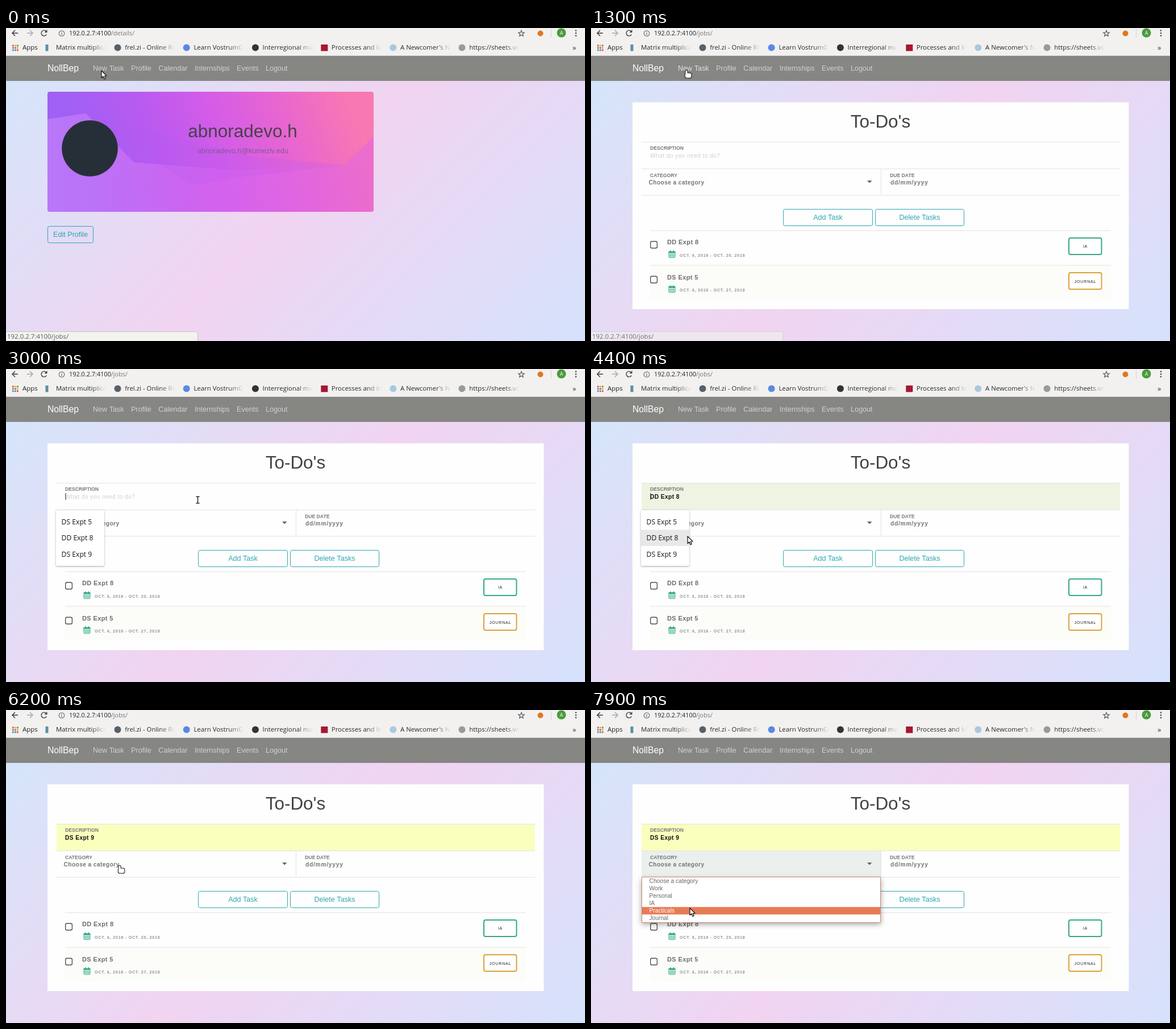
Recreate the animation shown at these times as an HTML page with a canvas. Size 1019 by 550 pixels, loop 8000 ms.

```html
<!DOCTYPE html>
<html lang="en">
<head>
<meta charset="utf-8">
<title>To-Do's</title>
<style>
  html, body { margin: 0; width: 100%; height: 100%; overflow: hidden; background: #f2f1f0; }
  canvas { display: block; width: 1019px; height: 550px; }
</style>
</head>
<body>
<canvas id="stage" width="1019" height="550"></canvas>
<script>
const ctx = document.getElementById('stage').getContext('2d');
const W = 1019, H = 550, LOOP = 8000, STEP = 100;
const REM = 12.58, SMALL = REM * 13 / 16;
const SANS = '"Liberation Sans", Arial, sans-serif';
const UI = '"Open Sans", "Noto Sans", sans-serif';
const TEAL = '#2fa5b0', GREEN = '#3fae92', LINE = '#e2e3e3', INK = '#444';
const HOST = '192.0.2.7:4100';

// Times at which the interface changes
const T = { hover: 100, load: 1000, page: 1300, settled: 1400, click: 2600, suggest: 2900,
            fill: 4000, preview: 4200, filled: 4800, pick: 5700, closed: 5800, blur: 6200,
            focus: 6400, list: 6500, browse: 6900 };

// Pointer legs: each eases from wherever the last one ended
const LEGS = [
  { from: 0, to: 1, x: 168, y: 75 },
  { from: 1500, to: 1900, x: 402, y: 301 },
  { from: 2100, to: 2400, x: 374, y: 267 },
  { from: 2500, to: 3000, x: 337.5, y: 230 },
  { from: 3900, to: 4300, x: 170, y: 294 },
  { from: 4400, to: 5000, x: 155, y: 294 },
  { from: 5000, to: 5500, x: 139, y: 318 },
  { from: 5800, to: 6200, x: 200, y: 274 },
  { from: 6800, to: 7100, x: 184, y: 323 },
  { from: 7400, to: 7800, x: 174, y: 348 }
];

const NAV = ['New Task', 'Profile', 'Calendar', 'Internships', 'Events', 'Logout'];
const SUGGESTIONS = ['DS Expt 5', 'DD Expt 8', 'DS Expt 9'];
const OPTIONS = ['Choose a category', 'Work', 'Personal', 'IA', 'Practicals', 'Journal'];
const BOOKMARKS = [
  ['Matrix multiplication', '#5b8fa5'], ['frel.zi - Online Room', '#56616b'],
  ['Learn VostrumGrid', '#5a88e4'], ['Interregional maps', '#333'],
  ['Processes and Ideas', '#a81631'], ["A Newcomer's Notes", '#a8c9de'],
  ['https://sheets.vo', '#9a9a9a']
];
const TASKS = [
  { name: 'DD Expt 8', dates: 'OCT. 6, 2018 - OCT. 20, 2018', tag: 'IA', color: '#35a78b' },
  { name: 'DS Expt 5', dates: 'OCT. 6, 2018 - OCT. 27, 2018', tag: 'JOURNAL', color: '#dca13a' }
];

const lerp = (a, b, k) => a + (b - a) * k;
const clamp = (v, a, b) => Math.max(a, Math.min(b, v));
const between = (t, a, b) => t >= a && t < b;
const easeOut = k => 1 - (1 - k) ** 2;
const mix = (a, b, k) => `rgb(${a.map((v, i) => Math.round(lerp(v, b[i], k)))})`;

function text(str, x, y, size, color, o = {}) {
  ctx.font = `${o.bold ? 'bold ' : ''}${size}px ${o.font || SANS}`;
  ctx.letterSpacing = (o.gap || 0) + 'px';
  ctx.textAlign = o.align || 'left';
  ctx.fillStyle = color;
  ctx.fillText(str, x, y);
  return ctx.measureText(str).width;
}

function rect(x, y, w, h, color) {
  ctx.fillStyle = color;
  ctx.fillRect(x, y, w, h);
}

function paint(fill, stroke, width = 1) {
  if (fill) { ctx.fillStyle = fill; ctx.fill(); }
  if (stroke) { ctx.strokeStyle = stroke; ctx.lineWidth = width; ctx.stroke(); }
}

function box(x, y, w, h, r, fill, stroke, width) {
  ctx.beginPath();
  ctx.roundRect(x, y, w, h, r);
  paint(fill, stroke, width);
}

function disc(x, y, r, fill, stroke, width) {
  ctx.beginPath();
  ctx.arc(x, y, r, 0, Math.PI * 2);
  paint(fill, stroke, width);
}

function poly(points, fill, stroke, width) {
  ctx.beginPath();
  points.forEach(([x, y]) => ctx.lineTo(x, y));
  ctx.closePath();
  paint(fill, stroke, width);
}

function line(color, width, ...points) {
  ctx.beginPath();
  points.forEach(([x, y]) => ctx.lineTo(x, y));
  paint(null, color, width);
}

function gradient(x0, y0, x1, y1, ...colors) {
  const g = ctx.createLinearGradient(x0, y0, x1, y1);
  colors.forEach((c, i) => g.addColorStop(i / (colors.length - 1), c));
  return g;
}

function shadowed(blur, dy, alpha, drawShape) {
  ctx.save();
  ctx.shadowColor = `rgba(0,0,0,${alpha})`;
  ctx.shadowBlur = blur;
  ctx.shadowOffsetY = dy;
  drawShape();
  ctx.restore();
}

function pointer(t) {
  let { x, y } = LEGS[0];
  for (const leg of LEGS) {
    const k = easeOut(clamp((t - leg.from) / (leg.to - leg.from), 0, 1));
    x = lerp(x, leg.x, k);
    y = lerp(y, leg.y, k);
  }
  return { x, y };
}

function pointerKind(t, { x, y }) {
  if (t < T.hover || t >= T.browse) return 'arrow';
  if (y < 90) return 'hand';
  if (between(t, T.suggest, T.closed) && x < 174 && y > 248) return 'arrow';
  if (between(y, 200, 247)) return 'beam';
  return between(y, 248, 293) && x < 510 ? 'hand' : 'arrow';
}

function drawHand() {
  const parts = () => {
    ctx.beginPath();
    ctx.roundRect(-1.6, -.5, 3.2, 9, 1.6);
    ctx.roundRect(-2.2, 4.6, 10.6, 7.8, 2.4);
  };
  parts();
  paint(null, '#111', 2);
  parts();
  paint('#fff');
}

function drawBeam() {
  for (const [color, width] of [['#fff', 3], ['#222', 1.5]]) {
    line(color, width, [0, -5.5], [0, 5.5]);
    for (const y of [-5.7, 5.7]) line(color, width, [-3, y], [3, y]);
  }
}

function drawArrow() {
  poly([[0, 0], [0, 12.5], [3, 10], [5, 14.7], [7.2, 13.8], [5.2, 9.3], [9, 9]], '#fff', '#111', 1.2);
}

function drawPointer(t, p) {
  ctx.save();
  ctx.translate(p.x, p.y);
  ctx.lineJoin = 'round';
  ({ arrow: drawArrow, hand: drawHand, beam: drawBeam })[pointerKind(t, p)]();
  ctx.restore();
}

function backArrow(x, dir, color) {
  line(color, 1.6, [x - 5 * dir, 9], [x + 5 * dir, 9]);
  line(color, 1.6, [x, 4], [x - 5 * dir, 9], [x, 14]);
}

function drawAddressRow(t) {
  backArrow(16, 1, INK);
  backArrow(42, -1, '#aaa');
  if (between(t, T.load, T.page)) {
    line(INK, 1.7, [63, 5], [71, 13]);
    line(INK, 1.7, [71, 5], [63, 13]);
  } else {
    ctx.beginPath();
    ctx.arc(67, 9, 4.8, .5, 5.4);
    paint(null, INK, 1.6);
    poly([[72.5, 3], [72.5, 8], [67.5, 8]], INK);
  }
  disc(98, 9.5, 4.8, null, '#666', 1.1);
  rect(97.4, 8.7, 1.2, 3.6, '#666');
  rect(97.4, 6.5, 1.2, 1.3, '#666');

  const w = text(HOST, 111, 13.3, 10.9, '#222', { font: UI });
  text(t < T.load ? '/details/' : '/jobs/', 111 + w, 13.3, 10.9, '#777', { font: UI });

  const star = Array.from({ length: 10 }, (_, i) => {
    const a = i * Math.PI / 5 - Math.PI / 2, r = i % 2 ? 2.4 : 5.5;
    return [907 + r * Math.cos(a), 9.8 + r * Math.sin(a)];
  });
  poly(star, null, '#555', 1.2);
  disc(940.5, 9.5, 5, '#e2761f');
  rect(959, 2, 1, 15, '#d5d4d2');
  disc(977.5, 8.5, 8, '#4a9b3c');
  text('A', 977.5, 12, 9, '#fff', { font: UI, align: 'center' });
  for (let i = -1; i <= 1; i++) disc(1003, 9 + i * 4.5, 1.3, INK);
}

function drawBookmarks() {
  const dots = ['#e2523f', '#efa53a', '#46a35a', '#4a84dd'];
  for (let i = 0; i < 9; i++)
    rect(11 + i % 3 * 4, 29.5 + Math.floor(i / 3) * 4, 2.8, 2.8, dots[i % 4]);
  text('Apps', 29, 38.3, 11.5, '#222', { font: UI });
  BOOKMARKS.forEach(([label, color], i) => {
    const x = 88 + i * 121.2, end = x + 88;
    if (i % 4) disc(x - 12.7, 34.5, 6, color);
    else rect(x - 18.5, 29, i ? 12 : 5, 11.5, color);
    const fade = gradient(end - 26, 0, end, 0, 'rgba(40,40,40,1)', 'rgba(40,40,40,0)');
    text(label, x, 38.3, 11.4, fade, { font: UI });
  });
  text('»', 997, 38.5, 13, '#333', { font: UI });
}

function drawNav(t) {
  rect(0, 49, W, 44, '#868683');
  text('NollBep', 73, 76.3, REM * 1.25, '#fff');
  let x = 153;
  NAV.forEach((label, i) => {
    const lit = i === 0 && between(t, T.hover, 1600);
    x += text(label, x, 74.8, REM, lit ? '#dfe3e6' : '#cdd3d6') + REM;
  });
}

function button(label, x, y, w) {
  box(x + .5, y + .5, w - 1, 29, 3, null, TEAL);
  text(label, x + w / 2, y + 18.7, REM, TEAL, { align: 'center' });
}

function drawProfile() {
  const right = 647, bottom = 323;
  ctx.save();
  ctx.beginPath();
  ctx.roundRect(73, 112, 574, 211, 4);
  ctx.clip();
  rect(73, 112, 574, 211, gradient(150, 250, 590, 90, '#a060f4', '#b85af0', '#d45ce8', '#e866cf', '#f878b2'));
  poly([[73, 160], [140, 150], [225, 236], [405, 250], [595, 241], [right, 190], [right, bottom], [73, bottom]],
       gradient(73, 0, right, 0, 'rgba(200,134,252,.6)', 'rgba(216,104,240,.6)', 'rgba(226,100,226,.5)'));
  poly([[140, 150], [325, 277], [405, 263], [595, 241], [430, 225]], 'rgba(180,85,240,.2)');
  ctx.restore();
  disc(147.5, 211.5, 49.3, '#262f38');
  text('abnoradevo.h', 416.5, 192, REM * 2.5, '#46424a', { align: 'center' });
  text('abnoradevo.h@kumeziv.edu', 417, 219.8, REM, '#80599a', { align: 'center' });
  button('Edit Profile', 73, 348, 81);
}

function drawCalendar(x, y) {
  box(x + .5, y + 2, 11, 10.5, 1, null, GREEN);
  rect(x, y + 1.5, 12, 3, GREEN);
  for (let i = 1; i <= 3; i++) rect(x + i * 2.75 + .1, y + 4, .8, 8, GREEN);
  for (let i = 1; i <= 2; i++) {
    rect(x, y + 4 + i * 2.7, 12, .8, GREEN);
    rect(x - 3 + i * 5.5, y, 1.6, 3, '#2b9379');
  }
}

function drawTask({ name, dates, tag, color }, i) {
  const y = 356 + i * 61.3, top = Math.round(y);
  if (i % 2) rect(104, top + 1, 811, 60, '#fcfdf9');
  rect(104, top - .5, 811, 1, LINE);
  box(104.7, y + 19, 11.7, 11.7, 2.5, '#fff', '#505050', 1.4);
  text(name, 134, y + 24.3, 11, '#6c6c6c', { bold: true, gap: .39 });
  drawCalendar(136.5, y + 35);
  text(dates, 156, y + 46, 7.08, '#8e9296', { bold: true, gap: .78 });
  box(841, top + 13, 57.5, 29, 3, '#fff', color, 2);
  text(tag, 870, y + 30.4, 7.08, '#222', { gap: .78, align: 'center' });
}

function caretOn(t) {
  if (t < T.click || t >= T.blur) return false;
  const reset = t < T.preview ? T.click : t < T.pick ? T.preview : T.pick;
  return (t - reset) % 1000 < 500;
}

function drawField(t, row) {
  const white = [254, 254, 254], focus = [238, 243, 226], yellow = [249, 255, 189];
  const k = clamp((t - T.fill) / (T.filled - T.fill), 0, 1) * 2;
  rect(89, 201, 842, 46, k < 1 ? mix(white, focus, k) : mix(focus, yellow, k - 1));
  rect(89, 200, 842, 1, LINE);
  rect(89, 247, 842, 1, LINE);
  label('DESCRIPTION', 104, 214);
  if (t < T.preview) text('What do you need to do?', 104, 227.6, SMALL, '#d0d0d0', { gap: .39 });
  else text(SUGGESTIONS[row], 104, 227.6, SMALL, '#111', { bold: true, gap: .39 });
  if (caretOn(t)) rect(t < T.pick ? 104.5 : 156.5, 218, 1, 12, '#222');
}

function label(str, x, y) {
  text(str, x, y, REM * 11 / 16, '#777', { bold: true });
}

function drawTodo(t, row) {
  rect(73, 130.5, 873.5, 363.5, '#fefefe');
  text("To-Do's", 509.5, 174.6, REM * 2.5, '#424242', { align: 'center' });
  drawField(t, row);

  if (t >= T.focus) rect(89, 248, 421, 46, '#ebefed');
  label('CATEGORY', 104, 261.5);
  text('Choose a category', 101.5, 274.8, SMALL, '#757575', { bold: true, gap: .39 });
  poly([[486, 268], [494.5, 268], [490.2, 272.5]], '#666');
  label('DUE DATE', 526, 261.5);
  text('dd/mm/yyyy', 527, 274.8, SMALL, '#757575', { bold: true, gap: .75 });
  rect(510, 248, 1, 45, LINE);
  rect(89, 293.5, 842, 1, LINE);

  button('Add Task', 338, 318, 158);
  button('Delete Tasks', 500, 318, 157);
  TASKS.forEach(drawTask);
}

function drawSuggestions(t, row) {
  const h = 28.5;
  shadowed(3, 1, .35, () => box(88, 248, 85, 98, 2, '#fff'));
  if (t >= T.preview) rect(88, 254 + row * h, 85, h, '#e8e8e8');
  SUGGESTIONS.forEach((s, i) => text(s, 97.5, 272.6 + i * h, 12.2, '#151515', { font: UI }));
}

function drawOptions(t, p) {
  const h = 13.05;
  const hot = t < T.browse ? 0 : clamp(Math.floor((p.y - 292.5) / h), 0, 5);
  shadowed(9, 3, .35, () => rect(89, 293.5, 421, 80.5, '#fff'));
  rect(90, 294 + hot * h, 419, h, '#e67c56');
  box(89.5, 293.5, 420, 80, 0, null, '#cf8770');
  OPTIONS.forEach((o, i) => text(o, 102.5, 304 + i * h, SMALL, i === hot ? '#fff' : '#6a6a6a'));
}

function drawStatus(t) {
  if (t >= T.settled) return;
  const fading = t >= T.page;
  ctx.globalAlpha = fading ? .6 : 1;
  box(-2, 533.5, 339.5, 20, 3, '#f2f2ef', '#c3c3c3');
  ctx.globalAlpha = fading ? .85 : 1;
  text(HOST + '/jobs/', 2, 546, 11.45, '#5c5c5c', { font: UI });
  ctx.globalAlpha = 1;
}

function draw(t) {
  const p = pointer(t);
  const row = t >= T.pick ? 2 : clamp(Math.floor((p.y - 254) / 28.5), 0, 2);
  rect(0, 49, W, H - 49, gradient(130, -80, 890, 680, '#d3e6fb', '#f1d4f1', '#d5e2fc'));
  rect(0, 0, W, 49, '#f2f1f0');
  rect(0, 48, W, 1, '#dcdbd9');
  drawAddressRow(t);
  drawBookmarks();
  drawNav(t);
  if (t < T.page) drawProfile();
  else drawTodo(t, row);
  if (between(t, T.suggest, T.closed)) drawSuggestions(t, row);
  if (t >= T.list) drawOptions(t, p);
  drawStatus(t);
  drawPointer(t, p);
}

const start = performance.now();
function tick() {
  const t = (performance.now() - start) % LOOP;
  draw(Math.floor(t / STEP) * STEP);
  requestAnimationFrame(tick);
}
tick();
</script>
</body>
</html>
```
